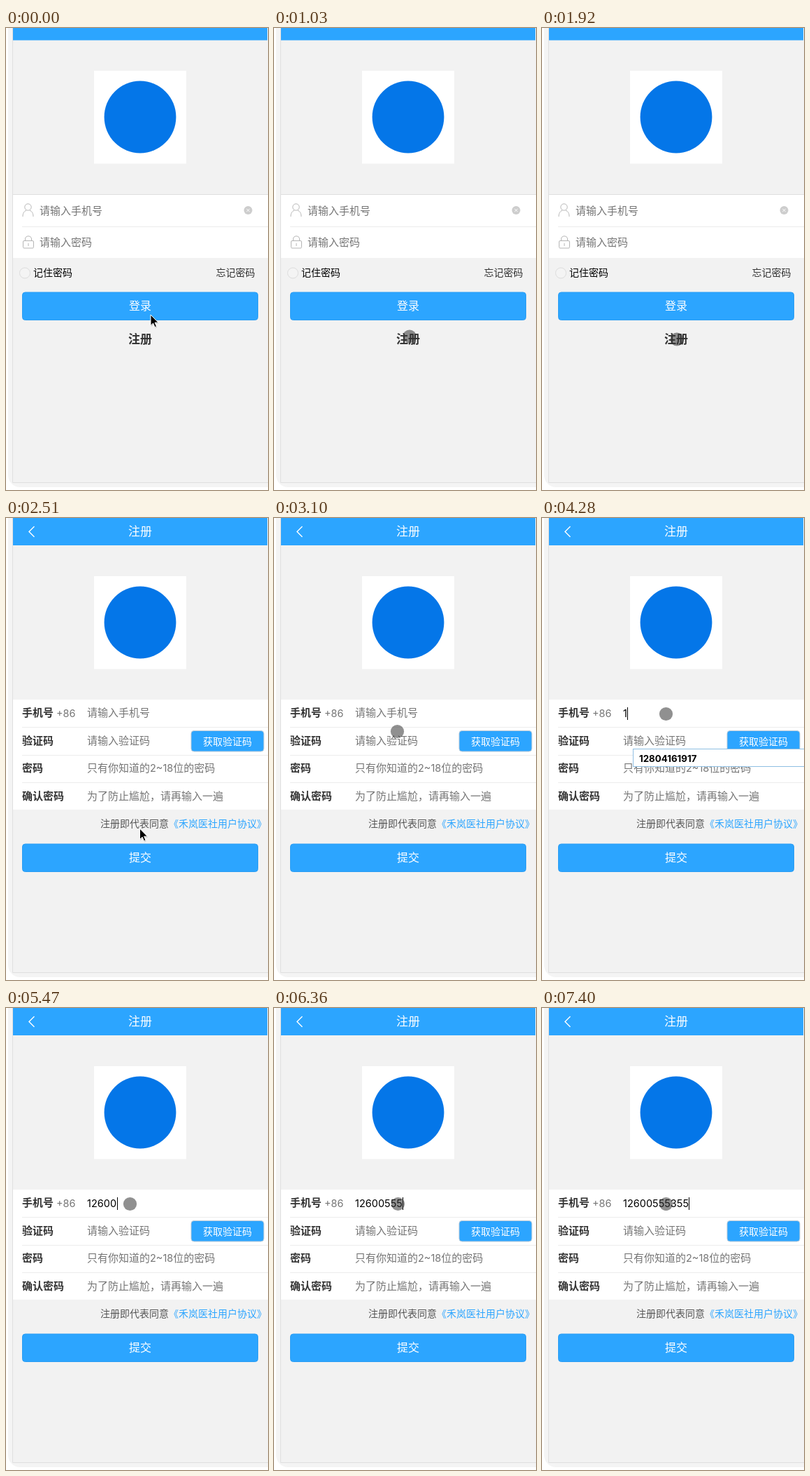
An HTML page that plays this animation: 375x659 px, repeating every 8000 ms.

```html
<!DOCTYPE html>
<html lang="zh-CN">
<head>
<meta charset="utf-8">
<title>注册</title>
<style>
  html, body { margin: 0; width: 100%; height: 100%; overflow: hidden; background: #fff; }
  svg { display: block; width: 375px; height: 659px; }
  text { font-family: Inter, "Noto Sans CJK SC", "Noto Sans CJK", sans-serif; white-space: pre; }
</style>
</head>
<body>
<svg id="stage" viewBox="0 0 375 659" xmlns="http://www.w3.org/2000/svg"></svg>
<script>
const LOOP = 8000;
const BLUE = '#2ca5ff', HINT = '#757575', INK = '#333', PAGE = '#f2f2f2';
const PHONE = '12600555355', SUGGESTION = '12804161917';
const stage = document.getElementById('stage');

function add(parent, tag, attrs, content) {
  const node = document.createElementNS('http://www.w3.org/2000/svg', tag);
  for (const key in attrs) node.setAttribute(key, attrs[key]);
  if (content) node.textContent = content;
  parent.appendChild(node);
  return node;
}
const group = parent => add(parent, 'g', {});
const rect = (parent, x, y, width, height, fill, more) =>
  add(parent, 'rect', { x, y, width, height, fill, ...more });
const line = (parent, d, stroke, width = 1) =>
  add(parent, 'path', { d, stroke, fill: 'none', 'stroke-width': width });
const circle = (parent, cx, cy, r, fill, more) =>
  add(parent, 'circle', { cx, cy, r, fill, ...more });

// cy is the middle of the glyphs
const label = (parent, content, x, cy, size, fill, more) =>
  add(parent, 'text', { x, y: cy + size * 0.33, 'font-size': size, fill, ...more }, content);
const centred = { 'text-anchor': 'middle' };
const bold = { 'font-weight': 700 };

function button(parent, content, y) {
  rect(parent, 23.5, y + 0.5, 337, 39.5, BLUE, { rx: 4, stroke: '#2a9df3' });
  label(parent, content, 192, y + 20, 16, '#fff', centred);
}
function logo(parent, y) {
  rect(parent, 126, y, 132, 132.5, '#fff');
  circle(parent, 192, y + 66, 51.4, '#0476e8');
}

// Device frame
rect(stage, 3, -30, 400, 685, '#f4f4f4', { rx: 17 });
rect(stage, 10, 0, 365, 648, PAGE);
line(stage, 'M9.5 0V648.5H375', '#dfdfdf');

// Login page
const login = group(stage);
rect(login, 10, 0, 364, 17.5, BLUE);
logo(login, 61);
rect(login, 10, 237, 365, 91, '#fff');
line(login, 'M10 237.5H375', '#dedede');
line(login, 'M23 283.5H375', '#ececec');
circle(login, 31.5, 255.5, 4.7, 'none', { stroke: '#b5b5b5' });
line(login, 'M24 269C24 264 26 261.5 29 260M34 260C37 261.5 39 264 39 269', '#b5b5b5');
rect(login, 24.5, 303.5, 15, 10.5, 'none', { rx: 1.5, stroke: '#b5b5b5' });
line(login, 'M27.5 303V301C27.5 295.5 36.5 295.5 36.5 301V303M32 307V311', '#b5b5b5');
label(login, '请输入手机号', 48, 261, 15, HINT);
label(login, '请输入密码', 48, 306.5, 15, HINT);
circle(login, 346.5, 260, 6, '#cdcdcd');
line(login, 'M344.3 257.8l4.4 4.4m0 -4.4l-4.4 4.4', '#fff');
circle(login, 27, 349.5, 7.5, '#f4f4f4', { stroke: '#dcdcdc' });
label(login, '记住密码', 39, 349.5, 14, '#000');
label(login, '忘记密码', 300.5, 349.5, 14, INK);
button(login, '登录', 376.5);
label(login, '注册', 192, 444, 17, INK, { ...centred, ...bold });

// Register page
const register = group(stage);
rect(register, 10, 0, 364, 39, BLUE);
line(register, 'M40.5 12L33 19.5L40.5 27', '#fff', 1.4);
label(register, '注册', 192, 19, 17, '#fff', centred);
logo(register, 83);
rect(register, 10, 259, 365, 157, '#fff');
for (const y of [298.5, 338.5, 377.5]) line(register, `M23 ${y}H375`, '#ececec');
['手机号', '验证码', '密码', '确认密码'].forEach((name, i) =>
  label(register, name, 23, 278.5 + i * 39.5, 15, INK, bold));
label(register, '+86', 72, 279, 14.5, HINT);
const phoneHint = label(register, '请输入手机号', 116, 278.5, 15, HINT);
label(register, '请输入验证码', 116, 318, 15, HINT);
const passHint = label(register, '只有你知道的', 116, 357.5, 15, HINT);
add(passHint, 'tspan', { 'font-size': 14.5 }, '2~18');
add(passHint, 'tspan', {}, '位的密码');
label(register, '为了防止尴尬，请再输入一遍', 116, 397, 15, HINT);
rect(register, 265, 303.5, 104, 29.5, BLUE, { rx: 4, stroke: '#b9cad8' });
label(register, '获取验证码', 317, 319, 14, '#fff', centred);
label(register, '注册即代表同意', 135, 436, 14, '#555');
label(register, '《禾岚医社用户协议》', 233, 436, 14, BLUE);
button(register, '提交', 464.5);

const typed = label(register, '', 116, 279, 14.5, '#000');
const caret = rect(register, 116, 270, 1, 18, '#000');
const dropdown = group(register);
rect(dropdown, 130.5, 329.5, 260, 25, '#fff', { stroke: '#8fbfe3' });
label(dropdown, SUGGESTION, 139, 343.4, 13.3, '#000', bold);

// Pointers
const touch = circle(stage, 0, 0, 9.6, '#323232', { 'fill-opacity': 0.54 });
const arrow = group(stage);
const arrowPath = 'M0 0V15.5L3.6 12.1L6 17.7L8.5 16.6L6.1 11.2H11Z';
add(arrow, 'path', { d: arrowPath, fill: '#000', 'fill-opacity': 0.2, transform: 'translate(.6 1.3)' });
add(arrow, 'path', { d: arrowPath, fill: '#000', stroke: '#fff', 'stroke-width': 1 });

// [time, pointer, x, y]
const moves = [
  [0, arrow, 207, 409],
  [740, touch, 204, 420], [890, touch, 199, 431], [1030, touch, 194, 440], [1180, touch, 190.5, 444],
  [1620, touch, 190, 441], [1770, touch, 192, 443], [1920, touch, 193, 444],
  [2510, arrow, 191.5, 443],
  [2810, touch, 187, 400], [2960, touch, 180, 345], [3100, touch, 176.5, 304.5],
  [3250, touch, 177, 288], [3400, touch, 177.5, 279.5]
];
const keyTimes = [4280, 4580, 4880, 5320, 5470, 5920, 6210, 6360, 6960, 7110, 7400];
const REGISTER_AT = 2510, FOCUS_AT = 3540, BLINK_AT = 3980;

const show = (node, on) => node.setAttribute('visibility', on ? 'visible' : 'hidden');

function render(t) {
  const onRegister = t >= REGISTER_AT;
  login.style.display = onRegister ? 'none' : '';
  register.style.display = onRegister ? '' : 'none';

  const count = keyTimes.filter(time => time <= t).length;
  typed.textContent = PHONE.slice(0, count);
  show(phoneHint, !count);
  show(dropdown, count === 1);
  show(caret, count > 0 || (t >= FOCUS_AT && t < BLINK_AT));
  caret.setAttribute('x', count ? Math.ceil(116 + typed.getComputedTextLength()) : 116);

  const [, pointer, x, y] = moves.filter(move => move[0] <= t).pop();
  for (const node of [touch, arrow]) show(node, node === pointer);
  pointer.setAttribute('transform', `translate(${x} ${y})`);
}

function tick() {
  render(performance.now() % LOOP);
  requestAnimationFrame(tick);
}
tick();
</script>
</body>
</html>
```
